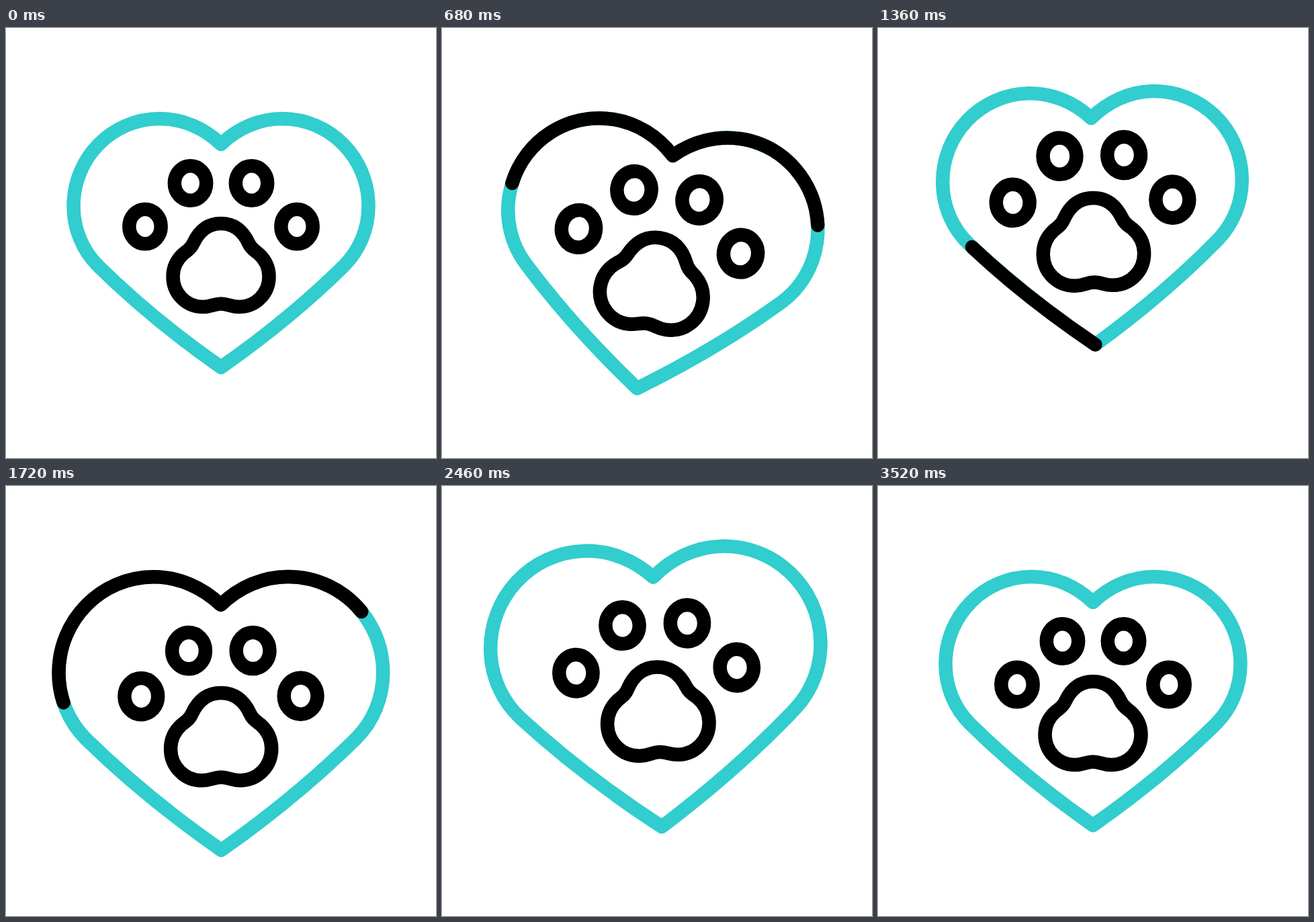
An HTML page that plays this animation: 640 by 640 pixels, repeating every 3600 ms.

```html
<!DOCTYPE html>
<html lang="en">
<head>
<meta charset="utf-8">
<title>Beating heart with paw</title>
<style>
  html, body { margin: 0; height: 100%; overflow: hidden; background: #fff; }
  svg { display: block; width: 100vw; height: 100vh; }
  g { fill: none; stroke: #000; stroke-linecap: round; stroke-linejoin: round; }
  ellipse { rx: 23.7px; ry: 25.8px; }
</style>
</head>
<body>
<svg viewBox="0 0 640 640">
  <defs>
    <path id="outline" pathLength="1" d="M320 505C270 470 205 421 137 354C114 331 100.5 299 100.5 265
      C100.5 193 158 135 229 135C263 135 295 149 320 173C345 149 377 135 411 135
      C482 135 539.5 193 539.5 265C539.5 299 526 331 503 354C435 421 370 470 320 505Z"/>
  </defs>
  <g id="heart">
    <use href="#outline" stroke="#32cdce"/>
    <use href="#outline" class="trace"/>
    <use href="#outline" class="trace"/>
  </g>
  <g id="paw">
    <ellipse cx="207" cy="295.5"/>
    <ellipse cx="274.5" cy="231"/>
    <ellipse cx="365.5" cy="231"/>
    <ellipse cx="433" cy="295.5"/>
    <path d="M320 291C298 291 286 305 279 320C275 329 270 331 264 336C254 345 248.5 357 248.5 370
      C248.5 395 268 415 293 415C306 415 309 410.5 320 410.5C331 410.5 334 415 347 415
      C372 415 391.5 395 391.5 370C391.5 357 386 345 376 336C370 331 365 329 361 320
      C354 305 342 291 320 291Z"/>
  </g>
</svg>
<script>
const LOOP = 3600, STROKE = 20.5;
const TRACE_GAP = 1077, TRACE_TIME = 1049, TAIL_DELAY = 317;

// Turning points as [ms, value]; the motion eases from one to the next.
const lift = [[0, 0], [410, 28], [770, 22.5], [1310, -38], [1960, 43.5], [2420, -20], [3220, 0]];
const tilt = [[130, 0], [870, 10.4], [1480, -2.3], [2060, 3.5], [2560, -2.6], [3320, 0]];

// Double beat: rest, swell, shallow dip, swell, rest. The paw follows the heart with a lag.
const beatTimes = [0, 220, 700, 1000, 1460, 1830, 2250, 2510, 3120];
const beatSizes = [1, 1.126, 1.055, 1.126];
const heartBeat = beatTimes.map((ms, i) => [ms, beatSizes[i % 4]]);
const pawBeat = heartBeat.map(([ms, size]) => [ms + (size > 1 ? 170 : 50), size]);

const heart = document.getElementById('heart');
const paw = document.getElementById('paw');
const traces = document.querySelectorAll('.trace');

function ease(x) {
  x = Math.min(1, Math.max(0, x));
  return x * x * (3 - 2 * x);
}

// Adds up the eased steps between neighbouring turning points.
function at(points, t) {
  return points.slice(1).reduce((sum, [ms, value], i) => {
    const [lastMs, lastValue] = points[i];
    return sum + (value - lastValue) * ease((t - lastMs) / (ms - lastMs));
  }, points[0][1]);
}

function place(group, beat, t) {
  const scale = at(beat, t);
  group.setAttribute('transform', `translate(320 ${320 + at(lift, t)}) ` +
    `rotate(${at(tilt, t)}) scale(${scale}) translate(-320 -320)`);
  group.setAttribute('stroke-width', STROKE / scale);
}

function draw(t) {
  place(heart, heartBeat, t);
  place(paw, pawBeat, t);
  traces.forEach((trace, i) => {
    const age = t - i * TRACE_GAP;
    const head = ease(age / TRACE_TIME);
    const tail = ease((age - TAIL_DELAY) / TRACE_TIME);
    trace.style.display = head - tail > 0.0005 ? '' : 'none';
    trace.setAttribute('stroke-dasharray', `${head - tail} 2`);
    trace.setAttribute('stroke-dashoffset', -tail);
  });
}

const start = performance.now();
function tick() {
  draw((performance.now() - start) % LOOP);
  requestAnimationFrame(tick);
}
tick();
</script>
</body>
</html>
```
